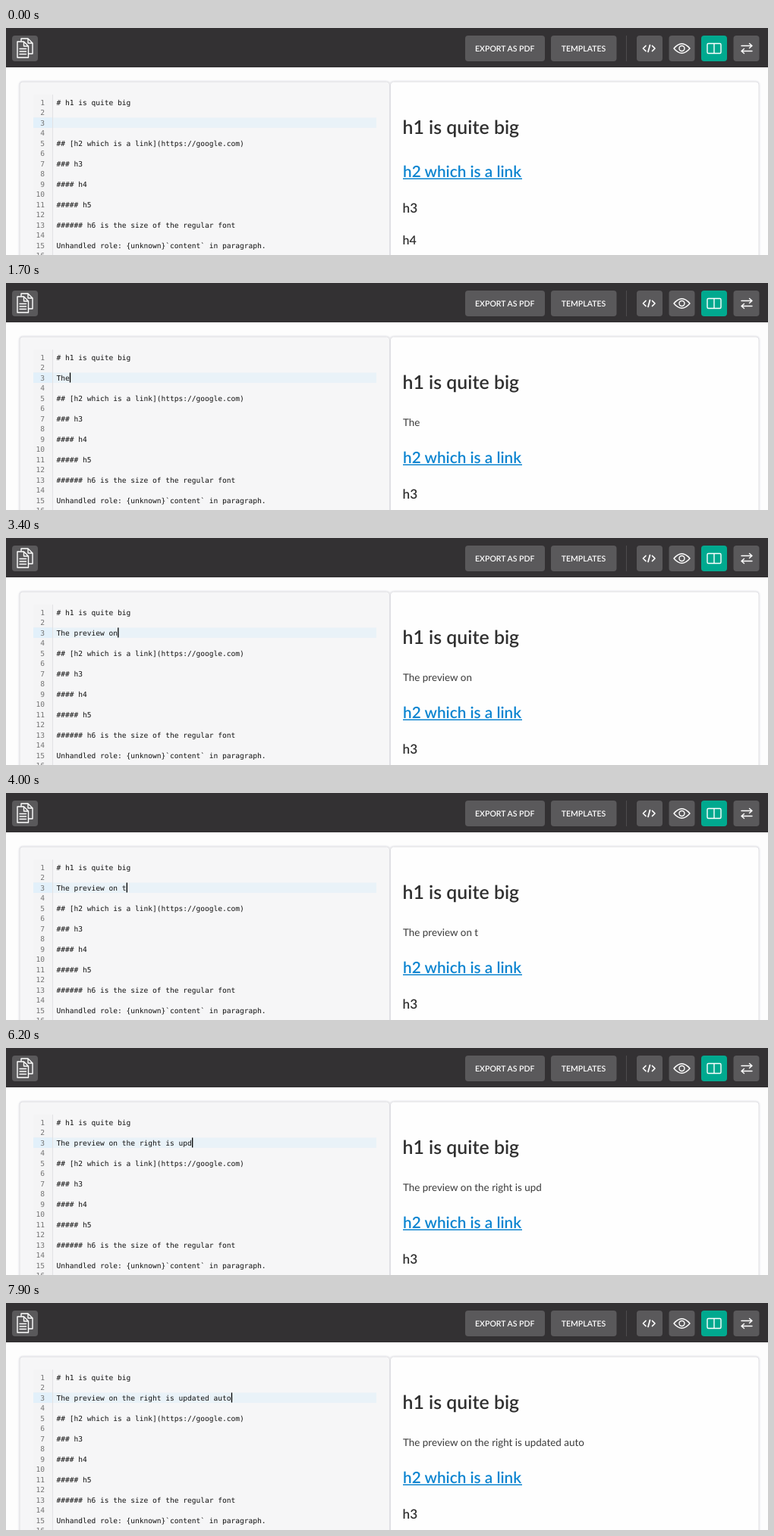
Write an HTML page that moves like this. It is 1004x300 px and loops after 8 s.

```html
<!DOCTYPE html>
<html lang="en">
<head>
<meta charset="utf-8">
<title>Live preview editor</title>
<style>
  html, body { margin: 0; width: 100%; height: 100%; overflow: hidden; background: #fdfdfd; }
  svg { display: block; text-rendering: geometricPrecision; }
  text { white-space: pre; }
  .code { font: 9.56px "DejaVu Sans Mono", monospace; fill: #111; }
  .num { fill: #747474; text-anchor: end; }
  .view { font-family: Lato, sans-serif; fill: #3a3a3a; }
  .head { font-weight: 600; fill: #303030; }
  .label { font: 600 10.5px Lato, sans-serif; fill: #fff; text-anchor: middle; }
  .icon { fill: none; stroke: #fff; stroke-width: 1.4; stroke-linejoin: round; stroke-linecap: round; }
</style>
</head>
<body>
<svg width="1004" height="300" viewBox="0 0 1004 300">
  <defs>
    <filter id="soft" x="-5%" y="-5%" width="110%" height="110%">
      <feDropShadow dx="0" dy="0" stdDeviation="1.2" flood-color="#334" flood-opacity=".18"/>
    </filter>
  </defs>

  <rect width="1004" height="52" fill="#333133"/>
  <g id="buttons"></g>
  <path d="M817.5 10V44" stroke="#4d4b4d"/>

  <g class="icon">
    <path d="M20 17V14H29L35 20V34H29.5M29 14V20H35"/>
    <path d="M15 18H23.5L29.5 24V39H15ZM23.5 18V24H29.5M18 27.5H26.5M18 31H26.5M18 34.5H26.5"/>
    <path stroke-width="1.7" d="M843 23.5L839.5 27L843 30.5M851.5 23.5L855 27L851.5 30.5M848.5 22.5L846 31.5"/>
    <path d="M880 27Q890.5 14.5 901 27Q890.5 39.5 880 27Z"/>
    <circle cx="890.5" cy="27" r="3.5"/>
    <path d="M925.5 20.5H940.5Q942 20.5 942 22V32Q942 33.5 940.5 33.5H925.5Q924 33.5 924 32V22Q924 20.5 925.5 20.5ZM933 20.5V33.5"/>
    <path d="M969 23.5H983M979.5 20.5L983 23.5L979.5 26.5M983 30.5H969M972.5 27.5L969 30.5L972.5 33.5"/>
  </g>

  <g filter="url(#soft)" stroke="#e0e0e4">
    <rect x="18" y="71" width="487.5" height="260" rx="4" fill="#f6f6f7"/>
    <rect x="506.5" y="71" width="485.5" height="260" rx="4" fill="#fefefe"/>
  </g>

  <rect x="36" y="88" width="25" height="212" fill="#f4f4f5"/>
  <rect x="36" y="118.5" width="452" height="13.5" fill="#e9f2f8"/>
  <rect x="36" y="118.5" width="25" height="13.5" fill="#e2f0fa"/>
  <path d="M61.5 88V300" stroke="#e2e2e4"/>
  <g id="editor" class="code"></g>
  <text id="typed" class="code" x="66.6" y="128.5"></text>
  <rect id="caret" y="118.5" width="1.3" height="13" fill="#000"/>

  <g class="view">
    <text class="head" x="522.5" y="139.5" font-size="24.9">h1 is quite big</text>
    <text id="paragraph" x="523" y="189" font-size="13.43"></text>
    <g id="below" class="head">
      <text x="523" y="196.7" font-size="20.75" style="fill:#0b84d0">h2 which is a link</text>
      <path d="M523 199.3H680" stroke="#0b84d0" stroke-width="1.5"/>
      <text x="522.5" y="244" font-size="17.2">h3</text>
      <text x="522.5" y="285.7" font-size="16">h4</text>
    </g>
  </g>
</svg>

<script>
const $ = id => document.getElementById(id);
const LOOP = 8000, CODE_X = 66.6, CHAR = 5.755, LINE = 13.5;

const buttons = [
  [8, 34], [605, 105, "EXPORT AS PDF"], [718, 86.5, "TEMPLATES"],
  [831, 34], [873.5, 34], [916, 34, "", "#00a98f"], [958.5, 34]
];
$("buttons").innerHTML = buttons.map(([x, w, label = "", fill = "#5a595b"]) =>
  `<rect x="${x}" y="10" width="${w}" height="34" rx="4" fill="${fill}"/>` +
  `<text class="label" x="${x + w / 2 - 0.3}" y="31">${label}</text>`).join("");

const source = {
  1: "# h1 is quite big",
  5: "## [h2 which is a link](https://google.com)",
  7: "### h3",
  9: "#### h4",
  11: "##### h5",
  13: "###### h6 is the size of the regular font",
  15: "Unhandled role: {unknown}`content` in paragraph."
};
let lines = "";
for (let n = 1; n <= 16; n++) {
  const y = 101.5 + LINE * (n - 1);
  lines += `<text class="num" x="51" y="${y}">${n}</text>` +
           `<text x="${CODE_X}" y="${y}">${source[n] || ""}</text>`;
}
$("editor").innerHTML = lines;

// Key press times in tenths of a second, one per character.
const sentence = "The preview on the right is updated auto";
const presses = [
  13, 15, 16, 18, 20, 22, 22, 24, 25, 27, 29, 31, 33, 34, 38, 40, 42, 43, 44,
  46, 47, 49, 50, 51, 52, 55, 56, 58, 59, 60, 62, 64, 65, 66, 67, 71, 73, 74, 76, 78
];

function draw() {
  const tick = Math.floor(performance.now() % LOOP / 100);
  const count = presses.filter(p => p <= tick).length;
  const text = sentence.slice(0, count);
  $("typed").textContent = text;
  $("paragraph").textContent = text;
  $("caret").setAttribute("x", CODE_X + count * CHAR);
  $("caret").setAttribute("visibility", count || (tick >= 1 && tick < 6) ? "visible" : "hidden");
  $("below").setAttribute("transform", `translate(0 ${count ? 41 : 0})`);
  requestAnimationFrame(draw);
}
draw();
</script>
</body>
</html>
```
